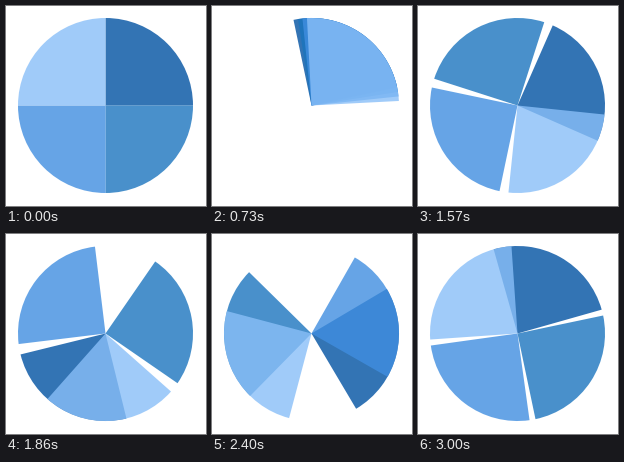
A matplotlib script that plays this animation: 200 px wide and 200 px high, repeating every 3030 ms.

```python
import matplotlib.pyplot as plt
from matplotlib.animation import FuncAnimation
from matplotlib.patches import Wedge

SIZE, DPI = 200, 100
LOOP_MS, TICK_MS = 3030, 10
POSES = 91
CENTER, RADIUS = (99.5, 99.5), 87.5

# Colour and whole turns per loop, clockwise from the top right quarter
SECTORS = [("#0051a2", 4), ("#1b75be", 3), ("#408ee0", 2), ("#89bff8", 1)]

fig = plt.figure(figsize=(SIZE / DPI, SIZE / DPI), dpi=DPI, facecolor="white")
ax = fig.add_axes([0, 0, 1, 1])
ax.set_xlim(0, SIZE)
ax.set_ylim(SIZE, 0)
ax.axis("off")

wedges = []
for i, (color, turns) in enumerate(SECTORS):
    wedge = Wedge(CENTER, RADIUS, 90 * i - 90, 90 * i, facecolor=color,
                  linewidth=0, alpha=0.8, antialiased=True, zorder=i + 1)
    wedge.set_snap(False)
    wedges.append(ax.add_patch(wedge))


def update(tick):
    # Poses are held for 30 or 40 ms, on a 10 ms clock
    pose = int((tick * TICK_MS + 4.9) * POSES / LOOP_MS)
    for i, (wedge, (_, turns)) in enumerate(zip(wedges, SECTORS)):
        start = 90 * i - 90 + 360 * turns * pose / POSES
        wedge.set_theta1(start)
        wedge.set_theta2(start + 90)
    return wedges


anim = FuncAnimation(fig, update, frames=LOOP_MS // TICK_MS,
                     interval=TICK_MS, repeat=True, repeat_delay=0)
plt.show()
```
